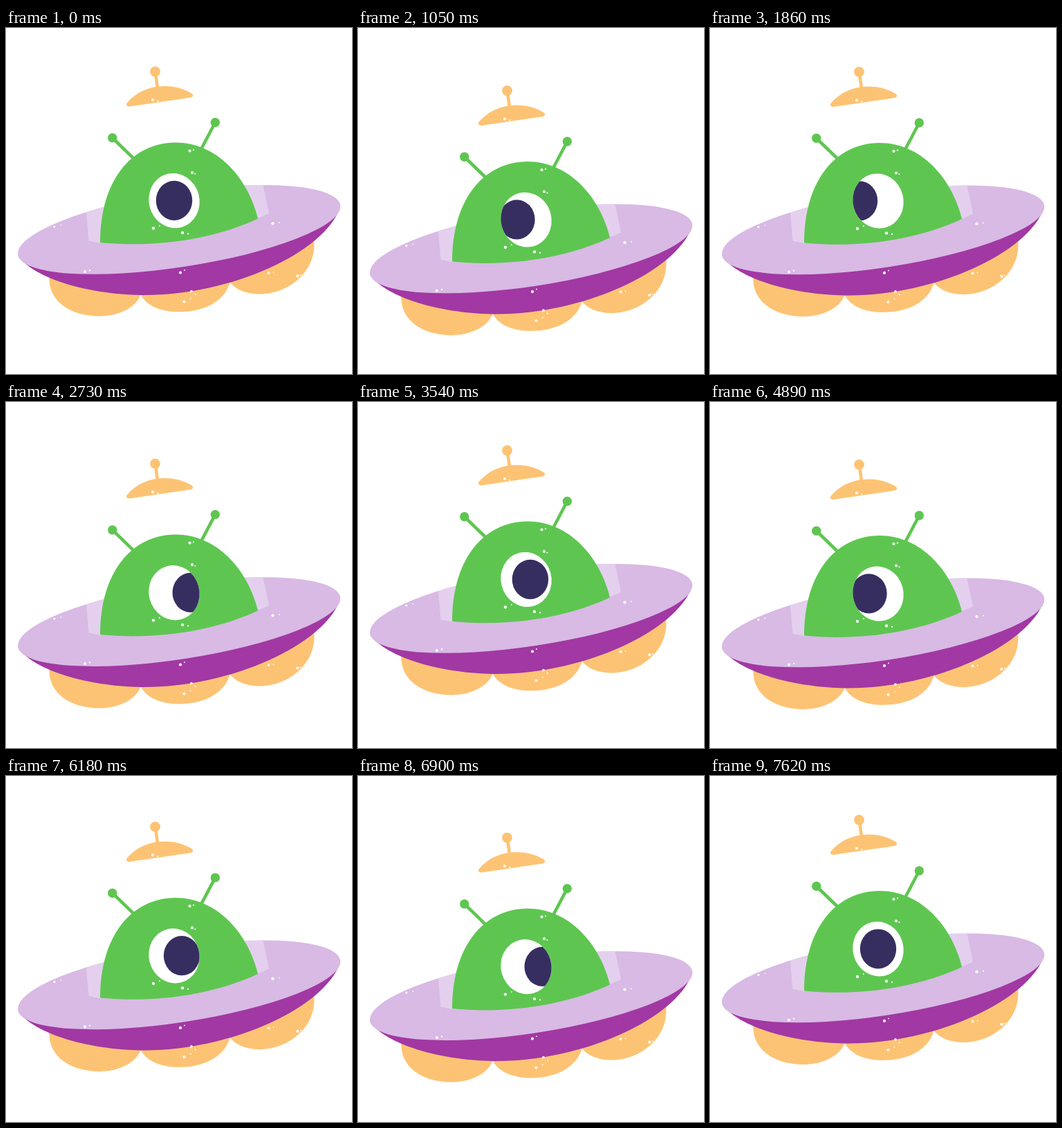
Recreate the animation shown at these times as an HTML page. Size 500x500 px, loop 7.68 s.

```html
<!DOCTYPE html>
<html lang="en">
<head>
<meta charset="utf-8">
<title>Hovering saucer</title>
<style>
  html, body { margin: 0; width: 100%; height: 100%; overflow: hidden; background: #fff; }
  svg { display: block; width: 100%; height: 100%; }
  .orange { fill: #fdc374; }
  .green { fill: #5ec650; }
  .stem { fill: none; stroke-width: 4.6; }
</style>
</head>
<body>
<svg viewBox="0 0 500 500">
  <defs>
    <path id="deck" d="M17.3 327.8A235.6 54.9 -8.73 0 1 483.1 256.2A235.6 53.5 -8.73 0 1 17.3 327.8Z"/>
    <clipPath id="rim"><use href="#deck"/></clipPath>
    <clipPath id="lid"><ellipse id="lidShape" cx="243" cy="249.5" rx="36.5" ry="39.8" transform="rotate(-15 243 249.5)"/></clipPath>
  </defs>
  <g id="ship">
    <!-- cap -->
    <path class="stem" stroke="#fdc374" d="M216 65L219 87"/>
    <circle class="orange" cx="215.5" cy="63" r="7.4"/>
    <path class="orange" d="M178 113.500Q173 113 174.200 109C188 92 208 84 229 84C245 84 259 88.500 269 95Q272 99 267 100.500Z"/>

    <!-- lamps and hull -->
    <g class="orange">
      <path d="M62.500 360C61 396 95 416.500 135 416.500C165 416.500 190 402 195 384Z"/>
      <path d="M194 384C202 402 225 410.300 250 410.300C290 410.300 318 392 324 366Z"/>
      <path d="M322 366C333 380 350 384.500 366 384.500C410 384.500 450 350 445 306Z"/>
    </g>
    <path fill="#a238a3" d="M17.500 327Q18 331 20 333C54 370 140 386 200 386C325 386 460 325 483 259Z"/>
    <use href="#deck" fill="#d8bae4"/>
    <path fill="#e4d0ee" clip-path="url(#rim)" d="M115.500 260L150 250L138 311L119.500 307.500ZM335 220L370 220L380 268L360 277Z"/>

    <!-- alien -->
    <path class="stem" stroke="#5ec650" d="M154 159L187 191M302.300 136.500L281 177"/>
    <circle class="green" cx="153.8" cy="158.8" r="6.7"/>
    <circle class="green" cx="302.3" cy="136.5" r="6.7"/>
    <path class="green" d="M136 310C136 222 180 166 245 165.500C304 165.500 349 215 364 275.500C300 305.500 215 318 136 310Z"/>

    <g id="specks" fill="#fff"></g>

    <g clip-path="url(#lid)">
      <rect x="200" y="205" width="86" height="90" fill="#fff"/>
      <ellipse id="pupil" cy="249.3" rx="26.2" ry="28.600" fill="#372e60"/>
    </g>
  </g>
</svg>
<script>
const LOOP = 7680, STEP = 80, TICK = 30;
const BOB = 1920, GLANCE = 3840, MOVE = 480;
const $ = id => document.getElementById(id);

let seed = 7;
const random = () => (seed = seed * 16807 % 2147483647) / 2147483647;
const dot = (x, y, r) => `<circle cx="${x}" cy="${y}" r="${r}"/>`;

// Each bright speck has a fainter one scattered near it.
const bright = [[70, 287], [114, 352], [212, 104], [265.5, 177.5], [269, 209], [213, 289.5], [255, 296],
  [385.5, 282.5], [252, 353.5], [268, 380.5], [257.5, 395.5], [379.5, 354], [421.5, 358.5]];
$('specks').innerHTML = bright.map(([x, y]) =>
  dot(x, y, 1.6 + .6 * random()) +
  dot(x + 4 + 6 * random(), y + 10 * random() - 5, .8 + .5 * random())).join('');

// 0 to 1 over one move that begins at the given time
const progress = (t, begin) => Math.min(1, Math.max(0, (t - begin) / MOVE));
const wave = turns => (1 - Math.cos(2 * Math.PI * turns)) / 2;
const eased = (t, begin) => wave(progress(t, begin) / 2);

function draw(ms) {
  const shown = Math.floor(ms % LOOP / TICK) * TICK;
  const t = Math.floor(shown / STEP) * STEP;
  const g = t % GLANCE;
  const left = 27, right = 23.7;
  const look = -left * eased(g, 800) + (left + right) * eased(g, 2000) - right * eased(g, 3200);

  $('ship').setAttribute('transform', `translate(0 ${28 * wave(t / BOB)})`);
  $('pupil').setAttribute('cx', 243 + look);
  $('lidShape').setAttribute('ry', 39.8 * (1 - wave(progress(g, 320))));
}

const start = performance.now();
function tick() {
  draw(performance.now() - start);
  requestAnimationFrame(tick);
}
tick();
</script>
</body>
</html>
```
